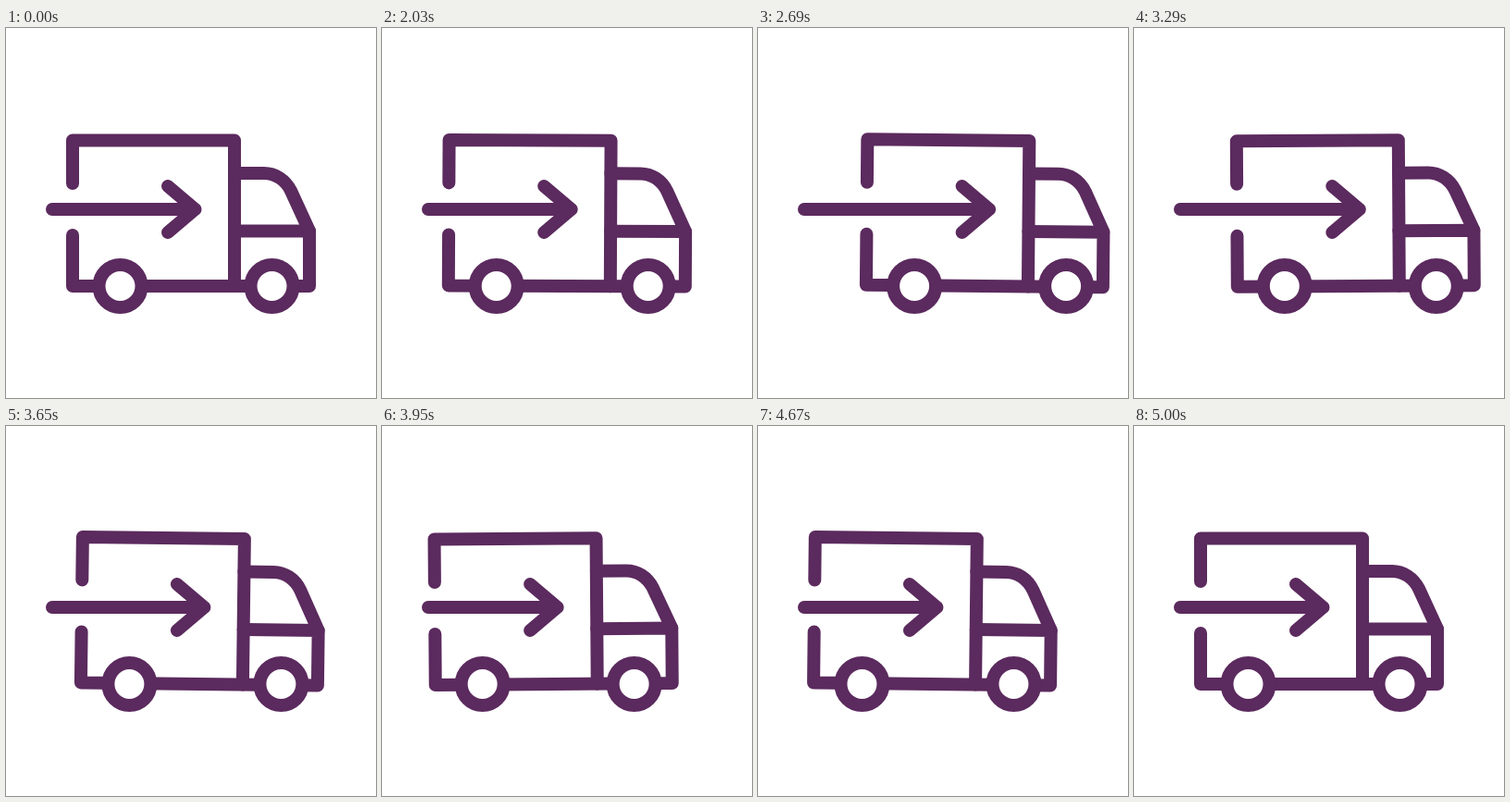
Recreate the animation shown at these times as an HTML page. Size 400x400 px, loop 5120 ms.

```html
<!DOCTYPE html>
<html lang="en">
<head>
<meta charset="utf-8">
<title>Delivery truck</title>
<style>
  html, body { margin: 0; width: 100%; height: 100%; overflow: hidden; background: #fff; }
  svg { display: block; width: 100%; height: 100%; }
</style>
</head>
<body>
<svg viewBox="0 0 400 400" fill="none" stroke="#5b2a5e" stroke-width="14"
     stroke-linecap="round" stroke-linejoin="round">
  <g id="body">
    <path d="M72 168V121.5H247V279"/>
    <path d="M72 224V279H328V219.5H247"/>
    <path d="M247 157H279C291 157 302 164 308 176L328 219.5"/>
  </g>
  <g id="wheels" fill="#fff">
    <circle cx="123.5" cy="279" r="23"/>
    <circle cx="287.5" cy="279" r="23"/>
  </g>
  <path id="arrow"/>
</svg>
<script>
  const LOOP = 5120, START = 2000, STEP = 30, DRIVE = 3000;
  const PEAK = 48.5, LOW = -26, TILT = 0.75, TILT_PERIOD = 500;
  const [body, wheels, arrow] = ['body', 'wheels', 'arrow'].map(id => document.getElementById(id));

  // Smooth 0..1 ramp between two times
  function ease(t, from, to) {
    const u = Math.min(1, Math.max(0, (t - from) / (to - from)));
    return u * u * (3 - 2 * u);
  }

  function shiftAt(t) {
    return PEAK * ease(t, 0, 810)
      + (LOW - PEAK) * ease(t, 1020, 2250)
      - LOW * ease(t, 2340, 2940);
  }

  function render(time) {
    const elapsed = Math.floor((time % LOOP - START) / STEP) * STEP;
    const t = Math.min(DRIVE, Math.max(0, elapsed));
    const x = shiftAt(t);
    const tilt = TILT * Math.sin(2 * Math.PI * t / TILT_PERIOD);
    const tip = 204.5 + x, wing = 175 + x;

    body.setAttribute('transform', `translate(${x} 0) rotate(${tilt} 200 200)`);
    wheels.setAttribute('transform', `translate(${x} 0)`);
    arrow.setAttribute('d', `M50 196H${tip}M${wing} 171L${tip} 196L${wing} 221`);
  }

  const begin = performance.now();
  function frame() {
    render(performance.now() - begin);
    requestAnimationFrame(frame);
  }
  frame();
</script>
</body>
</html>
```
